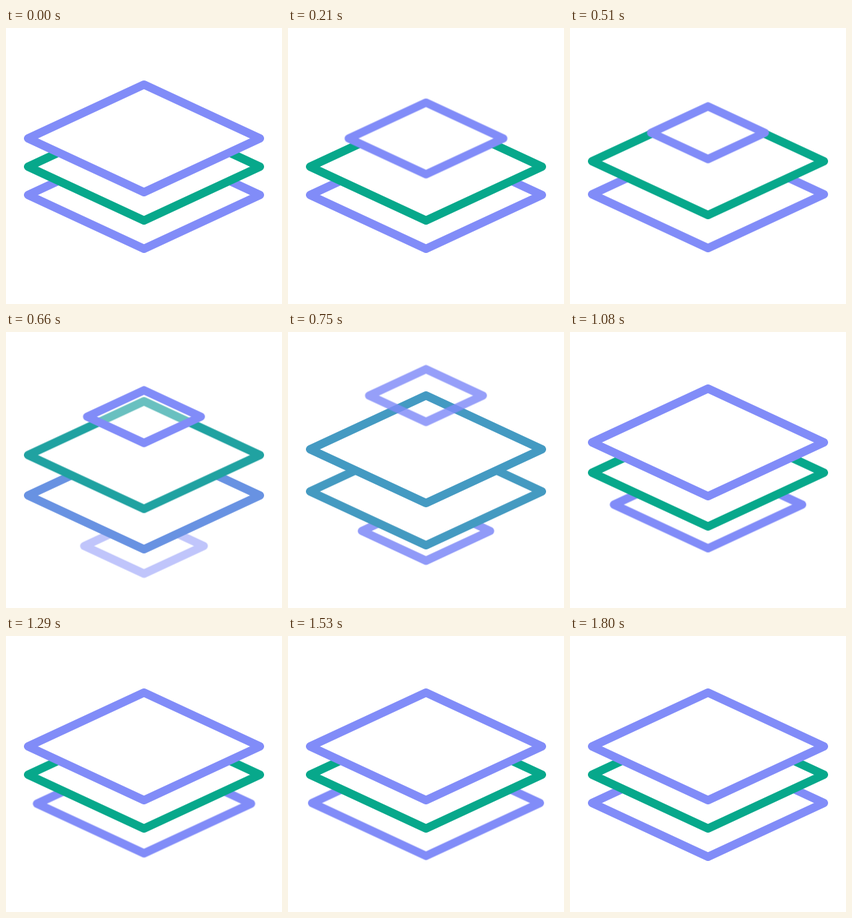
These frames come from a looping animation (400 px wide and 400 px high, 1.83 s). An HTML page:

```html
<!DOCTYPE html>
<html lang="en">
<head>
<meta charset="utf-8">
<title>Stacked layers</title>
<style>
  :root { --violet: #818cf8; --green: #07a88b; }
  html, body { margin: 0; width: 100%; height: 100%; overflow: hidden; background: #fff; }
  svg { display: block; width: 100%; height: 100%; }

  path {
    fill: #fff;
    stroke: var(--violet);
    stroke-width: 12px;
    stroke-linejoin: round;
    vector-effect: non-scaling-stroke;
  }
  g, path { animation: 1830ms linear infinite both; }

  /* The top sheet shrinks, rises and fades away. */
  .top { animation-name: leave; }
  .top path { animation-name: shrink, fade; }
  @keyframes leave {
    0%, 16.393% { transform: translate(200px, 160px); animation-timing-function: cubic-bezier(.65, 0, .35, 1); }
    59.836%, 100% { transform: translate(200px, 60px); }
  }
  @keyframes shrink {
    0% { transform: scale(1); animation-timing-function: cubic-bezier(.4, 0, .31, 1); }
    24.59%, 100% { transform: scale(.49); }
  }
  @keyframes fade {
    0%, 29.508% { fill-opacity: 1; stroke-opacity: 1; }
    39.344% { fill-opacity: 0; stroke-opacity: 1; }
    49.18%, 100% { fill-opacity: 0; stroke-opacity: 0; }
  }

  /* The two lower sheets each move up one place and swap colours. */
  .middle { animation-name: to-top; }
  .middle path { animation-name: to-violet; }
  .bottom { animation-name: to-middle; }
  .bottom path { animation-name: to-green; }
  @keyframes to-top {
    0%, 16.393% { transform: translate(200px, 201px); animation-timing-function: cubic-bezier(.423, 0, .505, 1); }
    55.738%, 100% { transform: translate(200px, 160px); }
  }
  @keyframes to-middle {
    0%, 19.672% { transform: translate(200px, 242px); animation-timing-function: cubic-bezier(.65, 0, .35, 1); }
    72.131%, 100% { transform: translate(200px, 201px); }
  }
  @keyframes to-violet {
    0%, 32.787% { stroke: var(--green); }
    49.18%, 100% { stroke: var(--violet); }
  }
  @keyframes to-green {
    0%, 32.787% { stroke: var(--violet); }
    49.18%, 100% { stroke: var(--green); }
  }

  /* A new sheet rises from below and grows to full size. */
  .next { animation-name: enter, appear; }
  .next path { animation-name: grow; }
  @keyframes enter {
    0%, 27.869% { transform: translate(200px, 342px); animation-timing-function: cubic-bezier(.153, 0, .177, 1); }
    77.049%, 100% { transform: translate(200px, 242px); }
  }
  @keyframes appear {
    0%, 29.508% { opacity: 0; }
    42.623%, 100% { opacity: 1; }
  }
  @keyframes grow {
    0%, 26.23% { transform: scale(.49); animation-timing-function: cubic-bezier(.4, 0, .31, 1); }
    98.361%, 100% { transform: scale(1); }
  }
</style>
</head>
<body>
<svg viewBox="0 0 400 400">
  <g class="next"><path d="M-168 0L0-78 168 0 0 78Z"/></g>
  <g class="bottom"><path d="M-168 0L0-78 168 0 0 78Z"/></g>
  <g class="middle"><path d="M-168 0L0-78 168 0 0 78Z"/></g>
  <g class="top"><path d="M-168 0L0-78 168 0 0 78Z"/></g>
</svg>
</body>
</html>
```
